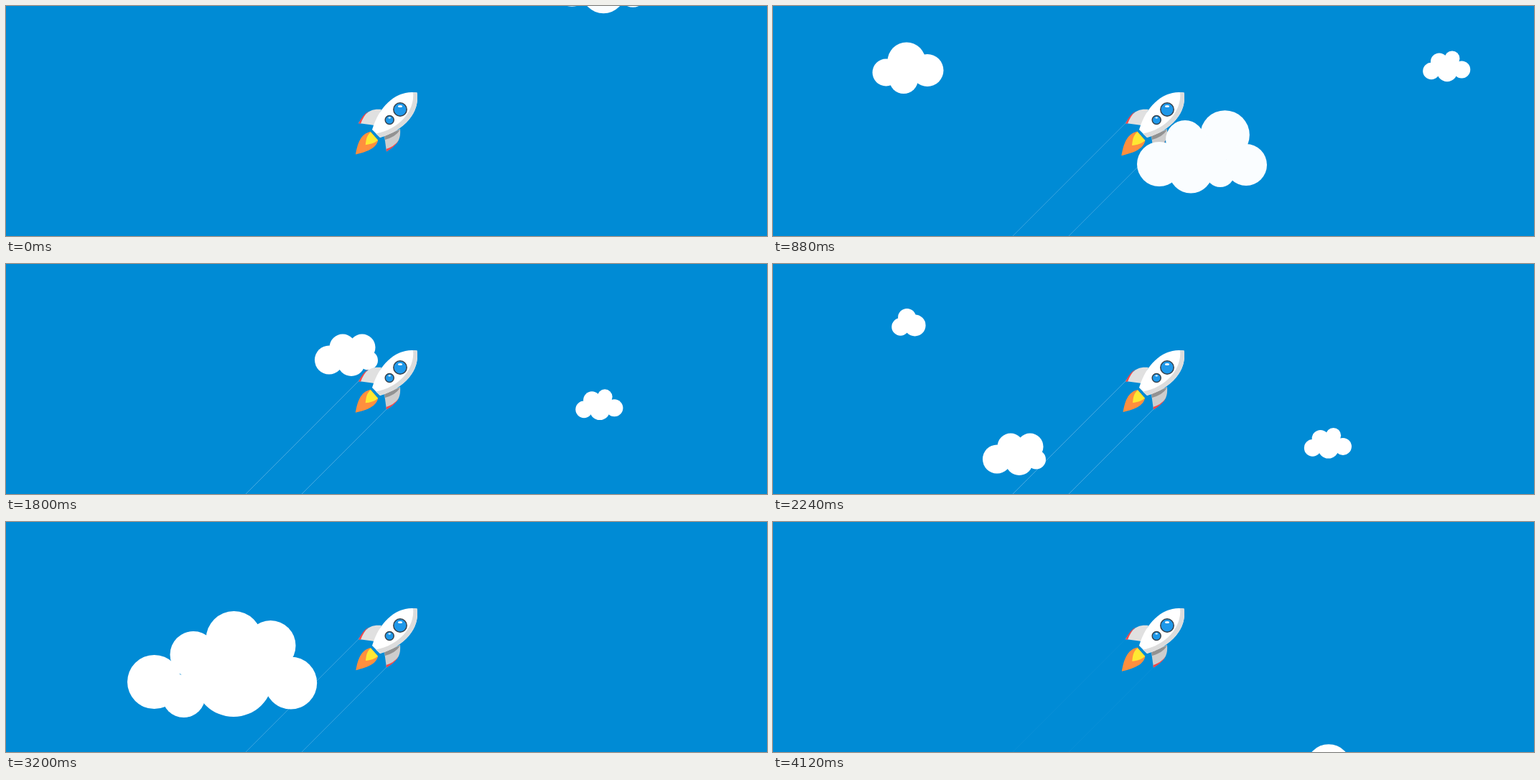
Recreate the animation shown at these times as an HTML page. Size 1060 px wide and 320 px high, loop 4.16 s.

```html
<!DOCTYPE html>
<html lang="en">
<head>
<meta charset="utf-8">
<title>Rocket in the sky</title>
<style>
  html, body { margin: 0; width: 100%; height: 100%; overflow: hidden; background: #008bd5; }
  svg { display: block; width: 100%; height: 100%; }
</style>
</head>
<body>
<svg viewBox="0 0 1060 320">
  <g id="back"></g>
  <path id="trails" d="M491 163 334 320M530 202 412 320" fill="none" stroke="#fff"/>
  <g id="rocket">
    <g id="flame">
      <path fill="#ff8f3e" d="M508 175C494 178 490 192 487.5 206C500 203 515 199 518 187Z"/>
      <path fill="#ffe832" d="M508 175.500C502 181 502 186 501 193C508 192 513 191 518 186.500Z"/>
    </g>
    <path fill="#e0e0e0" d="M523 144C508 143 502 147 491 163L513 166Z"/>
    <path fill="#f0484a" d="M491 163.500Q497 151 505 146Q498 153 494 163.700Z"/>
    <path fill="#cdcdcd" d="M549 171C550 186 546 192 530 202.500L527 181Z"/>
    <path fill="#929292" d="M549 172Q543 182 528 186L527 180Z"/>
    <path fill="#f0484a" d="M530 202.500Q542 196 547 187Q540 196 529.500 199Z"/>
    <path fill="#fff" d="M572.500 120.500C545 116 520 138 510 172L521 183C555 173 577 148 572.500 120.500Z"/>
    <path fill="#dcdcdc" d="M567 120Q570 120 572.500 120.500C577 148 555 173 521 183L515 177.500C547 172 570 146 567 120Z"/>
    <g fill="#1e98ea" stroke="#37424c" stroke-width="1.500">
      <circle cx="549" cy="144" r="9.200"/>
      <circle cx="534.200" cy="158.500" r="6"/>
    </g>
    <g fill="#fff">
      <ellipse cx="549" cy="139.500" rx="3" ry="1.500"/>
      <ellipse cx="534.200" cy="155.500" rx="1.800" ry="1"/>
    </g>
  </g>
  <g id="front"></g>
</svg>
<script>
const LOOP = 4160, STEP = 40;
const byId = id => document.getElementById(id);

// Puffs are [x, y, radius] at the moment "at"; speed is px per ms along both axes.
const puffy = [[-28.5, 15.5, 19], [0, 0, 26.5], [29, 12.5, 22.5], [-4, 25, 20]];
const place = (puffs, x, y, scale) =>
  puffs.map(([px, py, r]) => [x + px * scale, y + py * scale, r * scale]);

const clouds = [
  { layer: 'back', at: 880, speed: 0.1216, puffs: [
    [917, 90.5, 11.8], [928, 77.5, 12], [946, 73, 10.5], [959.3, 88.5, 12], [939, 91, 14.2]] },
  { layer: 'back', at: 1800, speed: 0.3136, puffs: [
    [450, 133.5, 20], [469, 116, 18.5], [496, 116, 18.5], [504.5, 134, 13.5], [481, 137, 19]] },
  { layer: 'back', at: 2640, speed: 0.289, puffs: [
    [62, 203, 12.3], [71, 190, 12.5], [82, 201, 15]] },
  { layer: 'front', at: 880, speed: 0.345, puffs: place(puffy, 186, 77, 1) },
  { layer: 'front', at: 880, speed: 0.2844, color: '#fafdff', puffs: [
    [538, 220, 31], [574, 186, 27], [629.5, 179.5, 34.3], [659, 221, 29],
    [623, 232, 20], [582, 230, 30.5], [608, 205, 25]] },
  { layer: 'front', at: 3200, speed: 0.3268, puffs: [
    [206.5, 222.5, 37.5], [261, 184.5, 32.5], [317.5, 163, 39], [368.5, 172, 35],
    [396.7, 224, 36.5], [317, 216, 55], [247.5, 242, 30]] },
  { layer: 'front', at: 4120, speed: 0.395, puffs: place(puffy, 774, 340.5, 1.18) }
];

function svgNode(name, attributes, parent) {
  const node = document.createElementNS(parent.namespaceURI, name);
  for (const key in attributes) node.setAttribute(key, attributes[key]);
  return parent.appendChild(node);
}

for (const cloud of clouds) {
  cloud.node = svgNode('g', { fill: cloud.color || '#fff' }, byId(cloud.layer));
  for (const [cx, cy, r] of cloud.puffs) svgNode('circle', { cx, cy, r }, cloud.node);
}

function draw(time) {
  for (const { node, at, speed } of clouds) {
    const shift = (time - at) * speed;
    node.setAttribute('transform', `translate(${-shift} ${shift})`);
  }
  const phase = time / LOOP;
  byId('trails').setAttribute('stroke-opacity', 0.27 * Math.sin(Math.PI * phase) ** 0.6);

  const flicker = 0.5 + 0.5 * Math.cos(2 * Math.PI * (17 * phase + 1 / 3));
  byId('flame').setAttribute('transform',
    `translate(513 181) scale(${1 + 0.09 * flicker}) translate(-513 -181)`);
}

const start = performance.now();
function tick() {
  const elapsed = (performance.now() - start) % LOOP;
  draw(Math.floor(elapsed / STEP) * STEP);
  requestAnimationFrame(tick);
}
tick();
</script>
</body>
</html>
```
